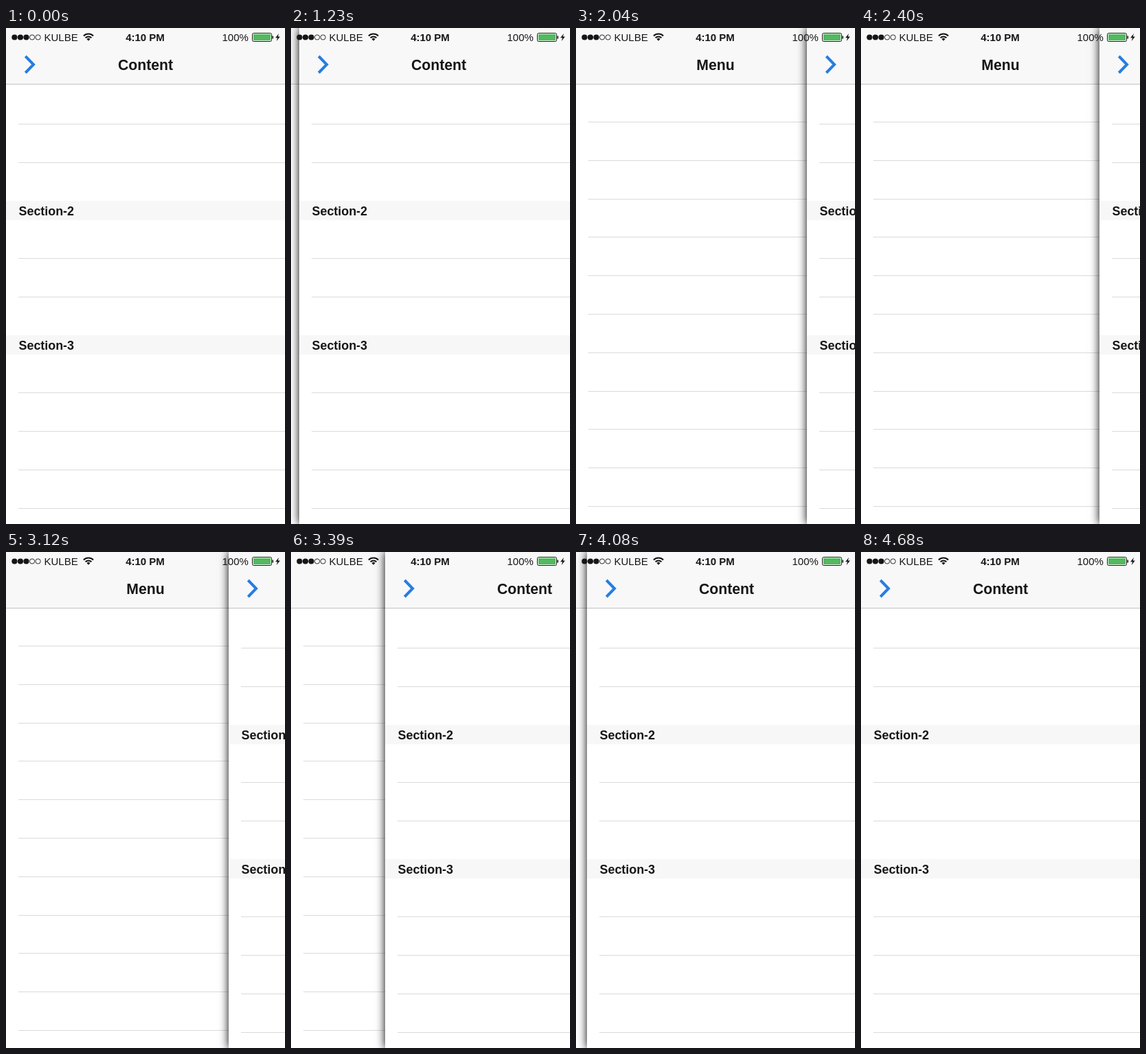
An HTML page with a canvas that plays this animation: 406 px wide and 720 px high, repeating every 5280 ms.

```html
<!DOCTYPE html>
<html lang="en">
<head>
<meta charset="utf-8">
<title>Bouncing drawer</title>
<style>
  html, body { margin: 0; width: 100%; height: 100%; overflow: hidden; background: #fff; }
  canvas { display: block; width: 100%; height: 100%; }
</style>
</head>
<body>
<canvas id="stage" width="406" height="720"></canvas>
<script>
const W = 406, H = 720, LOOP = 5280, STEP = 30;
const OPEN_X = 348, BOUNCE = 0.473;
const OPENING = { at: 1230, fall: 470, lead: 0.186 };
const CLOSING = { at: 3120, fall: 523, lead: 0.263 };
const FONT = '"Liberation Sans", Arial, sans-serif';
const INK = '#161616';
const ctx = document.getElementById('stage').getContext('2d');

// Progress of a body falling towards a wall and bouncing off it.
function drop(t, { at, fall, lead }) {
  if (t < at) return 0;
  let u = lead + (t - at) / fall;
  if (u < 1) return u * u;
  u -= 1;
  for (let v = BOUNCE; v > 0.005; v *= BOUNCE) {
    if (u < 2 * v) return 1 - (2 * v * u - u * u);
    u -= 2 * v;
  }
  return 1;
}

function paneX(t) {
  return Math.round(OPEN_X * (drop(t, OPENING) - drop(t, CLOSING)));
}

function fill(color, x, y, w, h) {
  ctx.fillStyle = color;
  ctx.fillRect(x, y, w, h);
}

function text(str, x, y, size, weight = 'bold', align = 'left') {
  ctx.font = `${weight} ${size}px ${FONT}`;
  ctx.textAlign = align;
  ctx.fillStyle = INK;
  ctx.fillText(str, x, y);
}

function poly(points) {
  ctx.beginPath();
  points.forEach(([x, y]) => ctx.lineTo(x, y));
}

function navBar(title) {
  fill('#f8f8f8', 0, 0, W, 81);
  fill('#c2c2c2', 0, 81, W, 1);
  text(title, 203, 61, 21.2, 'bold', 'center');
}

function rule(y) {
  fill('#dadada', 18, y, W - 18, 1);
}

function drawMenu() {
  fill('#fff', 0, 0, W, H);
  navBar('Menu');
  for (let i = 0; i < 11; i++) rule(Math.round(136 + 55.8 * i));
}

function drawPane(x) {
  ctx.save();
  ctx.translate(x, 0);
  ctx.save();
  if (x > 0) {
    ctx.shadowColor = '#000';
    ctx.shadowBlur = 12.7;
  }
  fill('#fff', 0, 0, W, H);
  ctx.restore();

  navBar('Content');
  poly([[28.3, 41], [40, 53], [28.3, 65]]);
  ctx.strokeStyle = '#267de3';
  ctx.lineWidth = 4;
  ctx.stroke();

  [139, 195, 334, 390, 529, 585, 641, 697].forEach(rule);
  [[2, 251], [3, 446]].forEach(([n, y]) => {
    fill('#f7f7f7', 0, y, W, 28);
    text('Section-' + n, 18.5, y + 21, 17.9);
  });
  ctx.restore();
}

function drawSignal() {
  ctx.fillStyle = ctx.strokeStyle = INK;
  ctx.lineWidth = 0.9;
  for (let i = 0; i < 5; i++) {
    ctx.beginPath();
    ctx.arc(12.4 + 8.55 * i, 13.5, i < 3 ? 4.1 : 3.6, 0, 2 * Math.PI);
    if (i < 3) ctx.fill(); else ctx.stroke();
  }
}

function drawWifi() {
  const a = -0.75 * Math.PI, b = -0.25 * Math.PI;
  ctx.lineWidth = 2;
  [6.2, 10].forEach(r => {
    ctx.beginPath();
    ctx.arc(120, 18.6, r, a, b);
    ctx.stroke();
  });
  ctx.beginPath();
  ctx.moveTo(120, 18.8);
  ctx.arc(120, 18.6, 3.6, a, b);
  ctx.fill();
}

function drawBattery() {
  ctx.lineWidth = 1;
  ctx.beginPath();
  ctx.roundRect(358.5, 7.5, 28, 12, 2);
  ctx.stroke();
  fill('#53b960', 360, 9, 25, 9);
  fill(INK, 387.5, 11.5, 1.5, 4);
  poly([[397, 8], [392, 14.2], [395, 14.2], [393.6, 19], [398.8, 12.4], [395.7, 12.4]]);
  ctx.fill();
}

function drawStatus() {
  drawSignal();
  text('KULBE', 55.5, 18.5, 15, 'normal');
  drawWifi();
  text('4:10 PM', 202.5, 18.5, 15, 'bold', 'center');
  text('100%', 314.5, 18.5, 15, 'normal');
  drawBattery();
}

const start = performance.now();
function frame() {
  const t = (performance.now() - start) % LOOP;
  drawMenu();
  drawPane(paneX(Math.floor(t / STEP) * STEP));
  drawStatus();
  requestAnimationFrame(frame);
}
frame();
</script>
</body>
</html>
```
